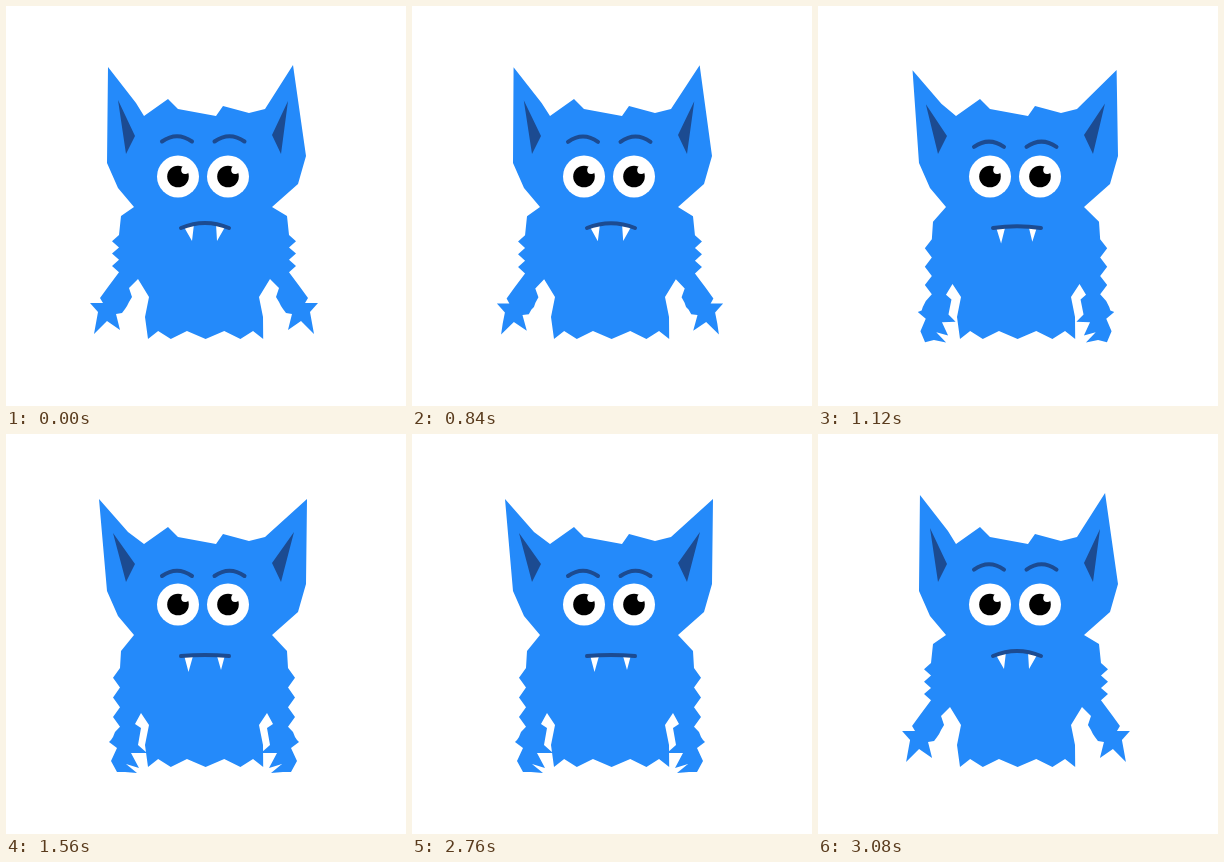
Animation of 400 by 400 pixels, one loop 3.2 s. Source, as an HTML page:

```html
<!DOCTYPE html>
<html lang="en">
<head>
<meta charset="utf-8">
<title>Blue monster</title>
<style>
  html, body { margin: 0; height: 100%; overflow: hidden; background: #fff; }
  svg { display: block; width: 100vw; height: 100vh; }
  .blue { fill: #248afa; }
  .dark { fill: #1c4b91; }
  .white { fill: #fff; }
  .line { fill: none; stroke: #1c4b91; stroke-width: 4; stroke-linecap: round; }
</style>
</head>
<body>
<svg viewBox="0 0 400 400">
  <defs>
    <clipPath id="eyeball"><circle r="21"/></clipPath>
    <g id="eye">
      <circle r="21" class="white"/>
      <circle r="10.8"/>
      <circle cx="7.2" cy="-6.5" r="4" class="white"/>
      <path id="lid" class="dark" clip-path="url(#eyeball)"/>
    </g>
    <path id="brow" class="line" d="M0 0q15 -10.5 30 0"/>
  </defs>
  <path id="body" class="blue"/>
  <path id="ears" class="dark"/>
  <path id="teeth" class="white"/>
  <path id="mouth" class="line"/>
  <g id="brows">
    <use href="#brow" x="156" y="135.5"/>
    <use href="#brow" x="208.5" y="135.5"/>
  </g>
  <use href="#eye" x="172" y="170.5"/>
  <use href="#eye" x="222" y="170.5"/>
</svg>
<script>
const LOOP = 3200;
const $ = id => document.getElementById(id);
const polygon = (...pts) => `M${pts.join(' ')}Z`;
const mirror = ([x, y]) => [396 - x, y];

// cubic-bezier(1/3, 0, 0, 1)
function ease(x) {
  if (x <= 0) return 0;
  if (x >= 1) return 1;
  let lo = 0, hi = 1;
  for (let i = 0; i < 24; i++) {
    const s = (lo + hi) / 2;
    if ((1 - s) ** 2 * s + s ** 3 < x) lo = s; else hi = s;
  }
  return lo * lo * (3 - 2 * lo);
}

// Up over `rise` ms from `start`, back over `fall` ms from `end`.
const pulse = (t, start, rise, end, fall) =>
  ease((t - start) / rise) - ease((t - end) / fall);

// Sad at k = 0, calm at k = 1.
const head = k => [
  [128, 201], [112, 182], [101, 157], [102 - 9 * k, 61 + 4 * k], [130 - 8 * k, 97 + k],
  [138, 110], [162, 93], [172, 103], [210, 110], [217, 100], [243, 107], [259, 103],
  [287 + 14 * k, 59 + 6 * k], [300, 150], [292, 178], [266, 201]
];

const fur = Array.from({ length: 7 }, (_, i) =>
  [i % 2 ? 106 : 113, 229 + 6.2 * i, 1, 5 + 3.6 * i]);

// x, y and the way each point travels: fur, forearm, fingers, elbow, waist.
const arm = [
  [115, 210, 0, 7], ...fur,
  [102, 281, 7, 17], [94, 292, 13, 11], [97, 297, 8, 9], [84, 297, 19, 11],
  [92, 306, 19, 8], [90, 317, 15, 10], [88, 328, 23, 10], [101, 315, 18, 23],
  [114, 324, 17, 15], [110, 308, 10, 22], [116, 307, 17, 27], [119, 303, 6, 16],
  [121, 300, 20, 19], [123, 296, 9, 15], [126, 291, 9, 3], [123, 282, 6, 8],
  [132, 273, 3, 6], [143, 291, 0, 0], [139, 311, 0, 0]
];

const hem = Array.from({ length: 9 }, (_, i) =>
  [142 + 14.4 * i - 6 * Math.sin(i * Math.PI / 4), i % 2 ? 325 : 333]);

function draw(t) {
  const k = pulse(t, 760, 800, 2760, 360);
  const left = arm.map(([x, y, dx, dy]) => [x + dx * k, y + dy * k]);
  $('body').setAttribute('d', polygon(
    ...head(k), ...left.map(mirror), ...hem.toReversed(), ...left.toReversed()));

  $('ears').setAttribute('d',
    polygon([112 - 5 * k, 94 + 5 * k], [129, 130], [120, 148]) +
    polygon([282 + 6 * k, 95 + 3 * k], [266, 129], [275, 148]));
  $('teeth').setAttribute('d',
    polygon([178, 221], [186 - 3.5 * k, 235 + 3 * k], [188 - k, 218 + 4 * k]) +
    polygon([210 + k, 218 + 4 * k], [211 + 4 * k, 235 + k], [219, 221]));
  $('mouth').setAttribute('d', `M175 222Q199 ${212 + 8 * k} 223 222`);
  $('brows').setAttribute('transform', `translate(0 ${6.5 * k})`);

  const closed = pulse(t, 440, 160, 600, 160) + pulse(t, 2440, 160, 2600, 160);
  const y = 34 * closed - 21, bulge = 4 * closed;
  $('lid').setAttribute('d',
    `M-22 -30H22V${y - bulge}Q0 ${y + bulge} -22 ${y - bulge}Z`);
}

function tick() {
  draw(performance.now() % LOOP);
  requestAnimationFrame(tick);
}
tick();
</script>
</body>
</html>
```
